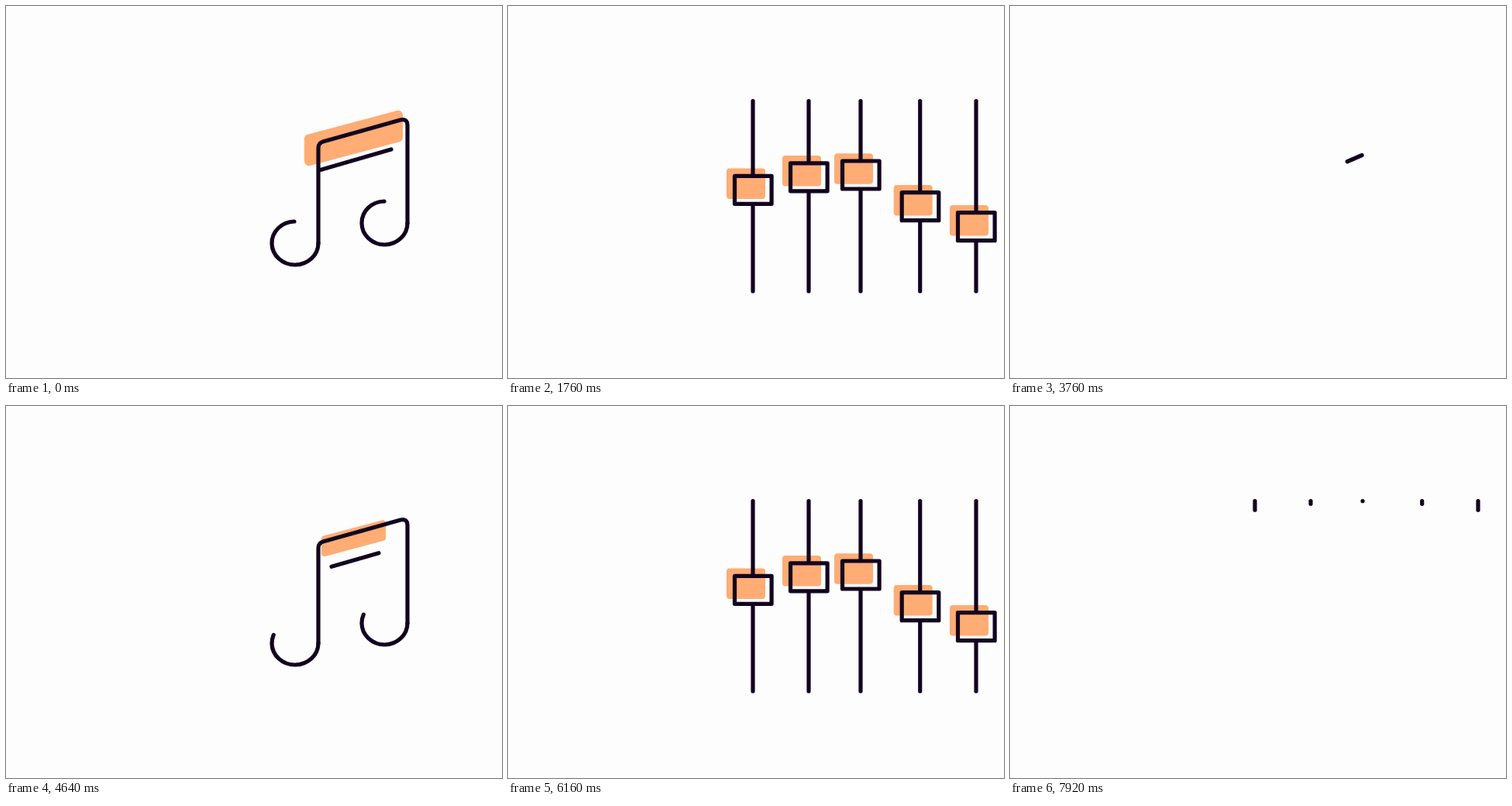
These frames come from a looping animation (640 px wide and 480 px high, 8000 ms). An HTML page with a canvas:

```html
<!DOCTYPE html>
<html lang="en">
<head>
<meta charset="utf-8">
<title>Music note and mixer</title>
<style>
html, body { margin: 0; width: 100%; height: 100%; overflow: hidden; background: #fdfdfd; }
canvas { display: block; }
</style>
</head>
<body>
<canvas id="stage" width="640" height="480"></canvas>
<script>
const ctx = document.getElementById('stage').getContext('2d');
const INK = '#12041f', ORANGE = '#ffac75', PAPER = '#fdfdfd';
const LOOP = 8000, CYCLE = 4400;
const TOP = 122.5, BOTTOM = 368;

const route = d => {
  const el = document.createElementNS('http://www.w3.org/2000/svg', 'path');
  el.setAttribute('d', d);
  return { path: new Path2D(d), len: el.getTotalLength() };
};

const noteHalves = [
  'M457.5 161.5L409 175Q403 177 403 183V306A30 28 0 1 1 372 278',
  'M457.5 161.5L509 147Q518 145 518 154V280A29.5 28 0 1 1 488 252'
].map(route);
const heads = [
  'M403 306A30 28 0 1 1 372 278',
  'M518 280A29.5 28 0 1 1 488 252'
].map(route);
// Each stem runs down, turns around and climbs as a mixer line.
const snakes = [
  { ...route('M457.5 161.5L409 175Q403 177 403 183V306'), turn: 'M403 306L402 370Q402 377 395 377Q388 377 388 370V122.5' },
  { ...route('M457.5 161.5L509 147Q518 145 518 154V280'), turn: 'M518 280V370Q518 377 525 377Q532 377 532 370V122.5' }
].map((s, i) => {
  const start = i ? 'M457.5 161.5L509 147Q518 145 518 154V280' : 'M457.5 161.5L409 175Q403 177 403 183V306';
  const full = route(start + s.turn.replace(/^M/, 'L'));
  return { ...full, head0: s.len, tail1: full.len - (BOTTOM - TOP) };
});
const bar = route('M404 212L497 185');

// Knob centres at each beat.
const BEATS = [1430, 1930, 2430, 2930];
const sliders = [
  { x: 316,   y: [261, 229, 179, 258] },
  { x: 388,   y: [246, 212, 237, 227] },
  { x: 455,   y: [218, 218, 301, 218] },
  { x: 531.7, y: [275, 253, 232, 253] },
  { x: 604,   y: [258, 294, 182, 255] }
].map((s, i) => ({ ...s, rank: Math.abs(i - 2) }));

const lerp = (a, b, k) => a + (b - a) * k;
const ramp = (t, a, b) => Math.min(1, Math.max(0, (t - a) / (b - a)));
const ease = (t, a, b) => (1 - Math.cos(Math.PI * ramp(t, a, b))) / 2;
const pop = (t, a, b) => 1 - (1 - ramp(t, a, b)) ** 3;

function trim({ path, len }, from, to) {
  if (to - from < 0.1) return;
  ctx.setLineDash([to - from, len * 2]);
  ctx.lineDashOffset = -from;
  ctx.stroke(path);
  ctx.setLineDash([]);
}

function line(x0, y0, x1, y1) {
  ctx.beginPath();
  ctx.moveTo(x0, y0);
  ctx.lineTo(x1, y1);
  ctx.stroke();
}

function noteBlock(k) {
  if (k <= 0) return;
  ctx.save();
  ctx.translate(448.5, 171);
  ctx.scale(k, k);
  ctx.beginPath();
  ctx.moveTo(0, -21);
  [[63.5, -38], [63.5, 3], [-63.5, 37], [-63.5, -4]].forEach(([x, y], i, all) => {
    const [nx, ny] = i < 3 ? all[i + 1] : [0, -21];
    ctx.arcTo(x, y, nx, ny, 6);
  });
  ctx.closePath();
  ctx.fill();
  ctx.restore();
}

function barLine(k) {
  const half = bar.len / 2;
  trim(bar, half * (1 - k), half * (1 + k));
}

function noteIn(t) {
  ctx.save();
  ctx.translate(433, 243);
  ctx.rotate(lerp(-7.5, 0, ease(t, 3700, 4380)) * Math.PI / 180);
  ctx.translate(-433, -243);
  noteBlock(pop(t, 4000, 4350));
  barLine(ease(t, 3650, 4010));
  const k = ease(t, 3770, 4270);
  noteHalves.forEach(h => trim(h, 0, h.len * k));
  ctx.restore();
}

function noteOut(t) {
  noteBlock(1 - ease(t, 100, 450));
  barLine(1 - ease(t, 120, 420));
  const curl = 1 - ease(t, 120, 480);
  heads.forEach(h => trim(h, 0, h.len * curl));
  const head = ease(t, 250, 1120), tail = ease(t, 400, 1180);
  snakes.forEach(s => trim(s, s.tail1 * tail, lerp(s.head0, s.len, head)));
}

function knobY(s, t) {
  let y = s.y[0];
  for (let i = 1; i < BEATS.length; i++) y += (s.y[i] - s.y[i - 1]) * ease(t, BEATS[i - 1], BEATS[i]);
  return y;
}

function knobState(s, t) {
  const a = 975 + s.rank * 50, b = 2930 + s.rank * 50;
  return {
    x: s.x + 0.3,
    y: knobY(s, t),
    drawn: ease(t, a, a + 450) * (1 - ease(t, b, b + 500)),
    fill: pop(t, a + 250, a + 600) * (1 - ease(t, b - 20, b + 230)),
    size: 1 + 0.3 * ease(t, b, b + 300) - 0.1 * ease(t, b + 300, b + 500)
  };
}

function knobBlock({ x, y, fill }) {
  if (fill <= 0) return;
  const w = 50 * fill, h = 39.5 * fill;
  ctx.beginPath();
  ctx.roundRect(x - 9.3 - w / 2, y - 8 - h / 2, w, h, 4 * fill);
  ctx.fill();
}

function knobFrame({ x, y, drawn, size }) {
  if (drawn <= 0) return;
  const w = 23.8 * size, h = 18 * size;
  ctx.beginPath();
  ctx.moveTo(x + w, y + h);
  ctx.lineTo(x - w, y + h);
  ctx.lineTo(x - w, y - h);
  ctx.lineTo(x + w, y - h);
  ctx.closePath();
  if (drawn < 1) ctx.setLineDash([Math.max(0.5, 4 * (w + h) * drawn), 1000]);
  ctx.stroke();
  ctx.setLineDash([]);
}

function mixerLine(s, t) {
  const out = 2981 + s.rank * 33;
  const end = lerp(BOTTOM, TOP, ease(t, out, out + 550));
  let start = TOP;
  if (s.rank === 1) {
    if (t < 1180) return;
  } else {
    const a = s.rank ? 830 : 620;
    if (t <= a) return;
    start = lerp(BOTTOM, TOP, ease(t, a, a + 508));
  }
  if (end - start > 0.1) line(s.x, start, s.x, end);
}

function mixer(t) {
  const knobs = sliders.map(s => knobState(s, t));
  knobs.forEach(knobBlock);
  ctx.save();
  ctx.beginPath();
  ctx.rect(0, 0, 640, 480);
  knobs.forEach(k => ctx.rect(k.x - 20, k.y - 18 * k.fill, 40, 36 * k.fill));
  ctx.clip('evenodd');
  sliders.forEach(s => mixerLine(s, t));
  ctx.restore();
  knobs.forEach(knobFrame);
}

function draw(now) {
  const t = (now % LOOP) % CYCLE;
  ctx.fillStyle = PAPER;
  ctx.fillRect(0, 0, 640, 480);
  ctx.fillStyle = ORANGE;
  ctx.strokeStyle = INK;
  ctx.lineWidth = 5.2;
  ctx.lineCap = ctx.lineJoin = 'round';
  if (t < 1180) noteOut(t);
  if (t > 600 && t < 3650) mixer(t);
  if (t > 3650) noteIn(t);
}

let origin;
function tick(now) {
  origin ??= now;
  draw(now - origin);
  requestAnimationFrame(tick);
}
draw(0);
requestAnimationFrame(tick);
</script>
</body>
</html>
```
